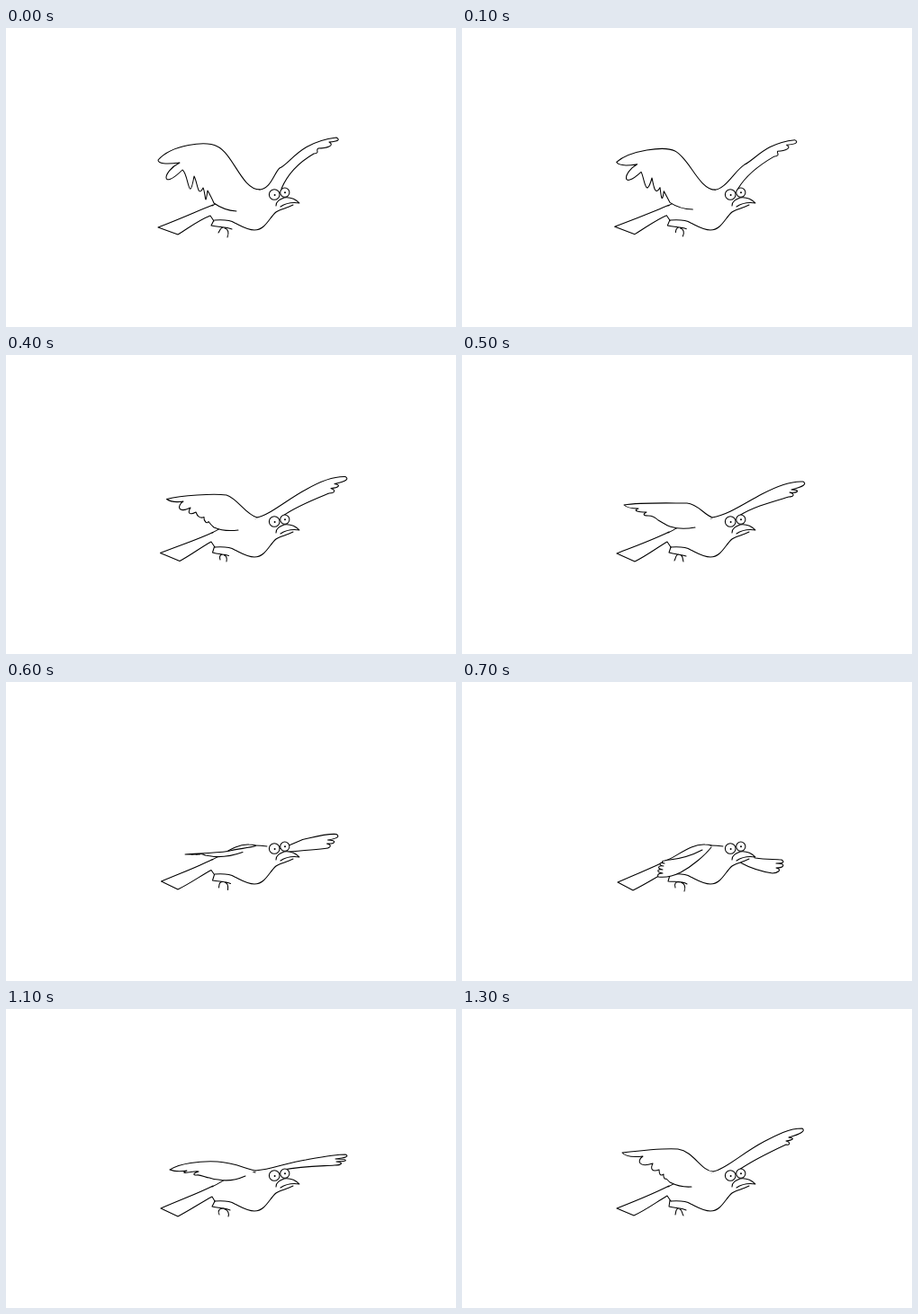
Write an HTML page without scripts that moves like this. It is 500x333 px and loops after 1400 ms.

```html
<!DOCTYPE html>
<html lang="en">
<head>
<meta charset="utf-8">
<title>Flapping bird</title>
<style>
html, body { margin: 0; width: 100%; height: 100%; overflow: hidden; background: #fff; }
svg { display: block; width: 100%; height: 100%; }
.ink { fill: none; stroke: #000; stroke-width: 1.05; stroke-linecap: round; stroke-linejoin: round; }
.paper { fill: #fff; }
.dot { fill: #000; stroke: none; }

/* Poses are held for 100 ms; steps() fills in the poses between keys. */
.near, .far, .tail, .legs { animation: 1.4s steps(2) infinite; }
.near { animation-name: near; }
.far { animation-name: far; }
.tail { animation-name: tail; }
.legs { animation-name: legs; }
.neck { animation: neck 1.4s step-end infinite; }

/* leading edge, feather lobes, trailing edge */
@keyframes near {
  0%, 100% {
    animation-timing-function: steps(3);
    d: path("M282 180C262 180 253 141 235 132C222 125 184 130 169 147Q169 153 193 150C173 160 172 182 196 158C203 162 203 199 209 165C213 172 213 190 219 178C222 184 221 202 224 181Q229 190 231 195Q242 203 256 204");
  }
  21.42% { d: path("M280 181C265 179 253 154 240 147C230 143 192 149 177 154Q186 159 198 155C191 161 185 180 205 165C202 175 206 179 215 171C213 180 216 184 222 177C219 186 224 190 225 183Q228 189 231 193Q242 199 257 198"); }
  35.71% { d: path("M278 181C268 177 262 166 250 165C230 165 198 164 180 167Q184 171 196 171C190 173 194 175 205 175C201 177 201 179 207 179C212 179 215 181 218 184C220 185 223 187 225 188Q228 190 231 191Q243 195 259 192"); }
  50% { d: path("M277 184C270 193 256 205 243 212C235 216 225 218 218 217Q216 213 223 213C216 212 216 208 223 209C217 208 217 204 224 205C218 204 219 200 225 202C221 201 222 199 225 199Q228 198 231 198Q250 196 267 187"); }
  64.28% { d: path("M277 183C278 201 289 213 299 226C308 237 315 243 319 250Q322 256 309 254C325 256 322 268 306 256C310 266 297 262 293 253C294 260 286 256 285 250C284 254 277 252 276 246Q262 226 260 216Q257 205 259 193"); }
  78.57% { d: path("M277 180C266 178 254 171 235 170C215 169 193 172 182 179Q190 182 201 180C196 182 197 183 202 182C206 182 211 180 214 181C208 183 207 185 212 185C216 184 222 188 226 188Q231 190 236 190Q250 193 266 186"); }
  92.85% {
    animation-timing-function: steps(1);
    d: path("M279 181C265 180 258 159 240 156C226 155 195 158 178 160Q183 166 201 164C194 169 196 177 212 172C209 178 211 182 219 179C219 183 220 187 224 184C223 188 226 190 227 189Q229 191 231 193Q243 199 255 198");
  }
}
@keyframes far {
  0%, 100% {
    animation-timing-function: steps(3);
    d: path("M280 180C294 181 298 161 304 156C316 151 326 127 367 122Q374 126 359 127C366 131 356 134 347 134C343 136 350 139 342 140C330 147 314 160 306 179");
  }
  21.42% { d: path("M279 181C290 179 312 156 333 145C347 136 360 130 375 130Q382 134 364 137C369 139 366 142 358 144C362 146 364 149 355 150C341 158 321 168 308 179"); }
  35.71% { d: path("M278 181C296 178 314 165 333 155C348 147 365 140 379 141Q386 145 366 150C376 150 374 154 364 153C371 155 368 158 363 158C343 164 324 169 308 179"); }
  50% { d: path("M316 193C320 194 323 195 326 196C338 198 348 197 355 198Q361 202 349 202C361 202 358 207 349 207C357 209 350 213 345 213C332 211 320 207 309 201"); }
  64.28% { d: path("M280 190C280 200 290 215 295 225C300 235 305 240 308 248Q305 252 300 252C296 254 292 252 290 250C284 250 280 250 275 246C267 242 263 230 261 218"); }
  78.57% { d: path("M277 180C295 179 312 171 333 168C350 165 366 162 377 162Q384 165 366 167C381 167 381 170 367 170C376 171 373 174 365 174C350 175 330 175 308 179"); }
  92.85% {
    animation-timing-function: steps(1);
    d: path("M279 181C292 179 312 160 335 148C350 140 363 133 378 133Q384 137 363 143C371 144 367 146 360 147C365 148 365 152 360 151C345 158 324 168 308 179");
  }
}
@keyframes tail {
  0%, 100% {
    animation-timing-function: steps(3);
    d: path("M230 197C212 204 200 210 169 222L191 230C204 222 214 214 227 209L231 215");
  }
  21.42% { d: path("M230 198C214 205 200 209 171 220L194 229C206 222 216 214 228 208L232 214"); }
  35.71% { d: path("M230 197C214 205 200 210 172 221L192 230C206 223 216 215 228 208L232 214"); }
  50% { d: path("M229 198C214 206 200 211 173 223L190 232C206 224 216 217 228 211L231 215"); }
  64.28% { d: path("M229 198C214 206 200 209 174 222L192 231C206 223 216 216 229 209L231 215"); }
  78.57% { d: path("M230 197C214 205 200 210 172 222L191 231C206 223 216 216 229 209L232 214"); }
  92.85% {
    animation-timing-function: steps(1);
    d: path("M230 197C214 205 200 211 172 222L191 230C206 223 216 215 228 208L232 214");
  }
}
@keyframes legs {
  0%, 100% {
    animation-timing-function: steps(3);
    d: path("M231 214L228 220C236 222 244 221 251 224M242 222C238 222 238 225 236 228M243 223C247 224 248 228 246 233");
  }
  21.42% { d: path("M231 213L229 220C235 222 241 221 246 223M240 222C236 223 237 227 240 227M242 223C245 224 246 227 244 230"); }
  35.71% { d: path("M232 214L230 220C237 222 243 222 249 224M241 222C237 222 238 226 236 229M243 223C246 224 245 228 246 230"); }
  50%, 64.28% { d: path("M231 215L229 222C236 223 244 221 250 225M242 223C236 222 236 226 237 229M243 223C247 224 249 228 247 233"); }
  78.57% { d: path("M232 214L229 220C236 222 243 221 249 224M242 222C236 222 235 226 237 229M243 223C247 224 248 228 247 231"); }
  92.85% {
    animation-timing-function: steps(1);
    d: path("M231 213L230 220C237 222 243 221 249 224M241 222C237 222 238 226 237 229M242 223C245 224 244 227 246 230");
  }
}
@keyframes neck {
  0%, 71.42% { visibility: hidden; }
  42.85% { visibility: visible; }
}
</style>
</head>
<body>
<svg viewBox="0 0 500 333">
  <g class="ink">
    <path class="far paper"/>
    <path class="paper" stroke="none" d="M228 199C243 191 256 180 270 181L290 183L312 189L326 195L300 205C292 212 288 225 276 225C268 225 262 221 254 217Q248 213 232 214L227 209Z"/>
    <path class="tail"/>
    <path class="legs"/>
    <path d="M229 198C243 191 256 180 270 181Q274 181 277 182"/>
    <path class="neck" d="M276 182Q283 182 290 183"/>
    <path d="M319 197C311 201 304 202 300 205C292 212 288 225 276 225C268 225 262 221 254 217Q248 213 232 214"/>
    <path class="near paper"/>
    <path class="paper" d="M300 198C300 193 304 191 309 189C316 188 322 191 326 195C319 194 311 195 305 199"/>
    <circle class="paper" cx="298.2" cy="185.5" r="5.8"/>
    <circle class="paper" cx="309.8" cy="183.2" r="5.1"/>
    <circle class="dot" cx="298.6" cy="186" r="1"/>
    <circle class="dot" cx="310" cy="183.2" r="1"/>
  </g>
</svg>
</body>
</html>
```
